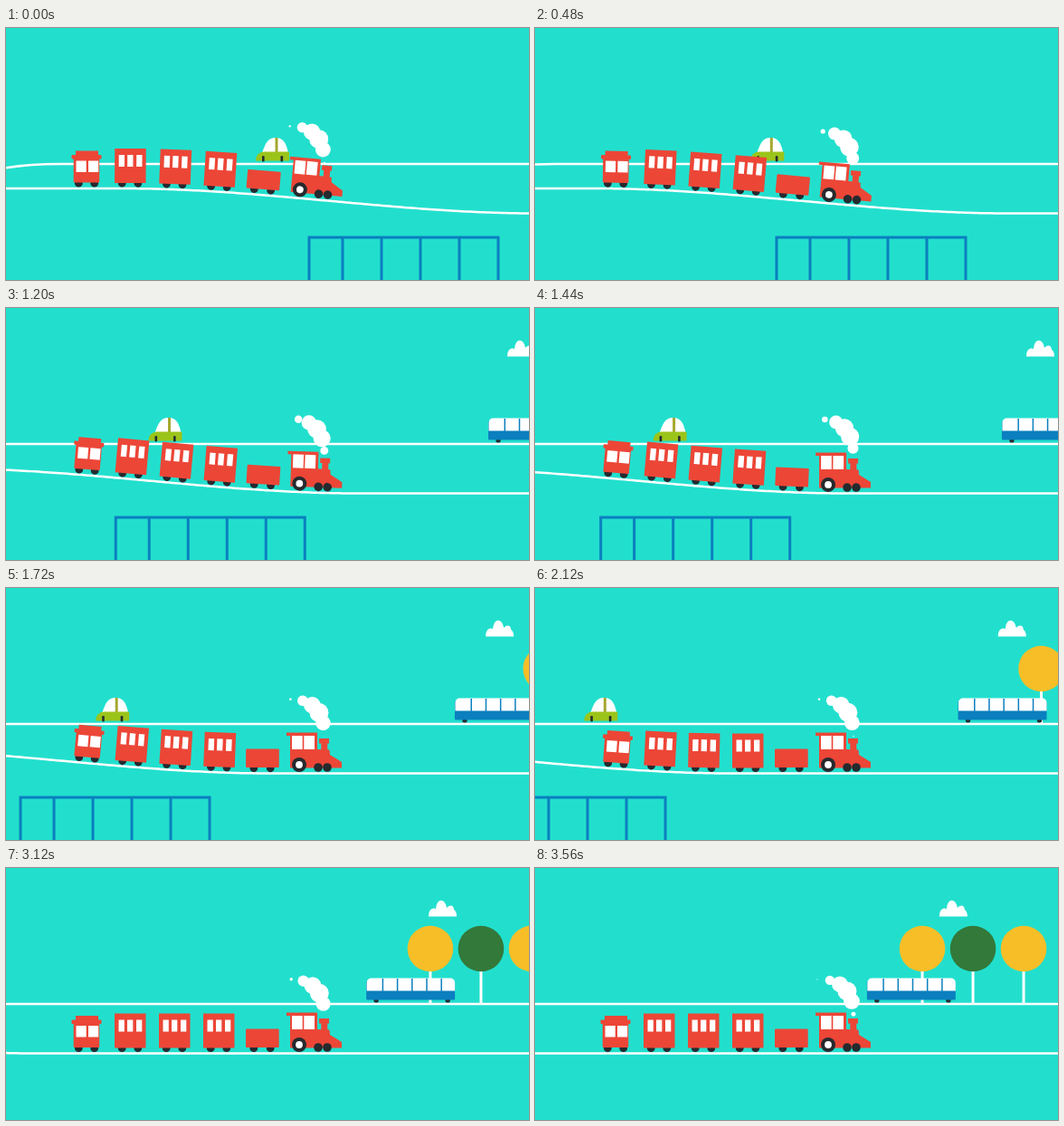
Recreate the animation shown at these times as an HTML page with a canvas. Size 578 by 278 pixels, loop 3.6 s.

```html
<!DOCTYPE html>
<html lang="en">
<head>
<meta charset="utf-8">
<title>Train</title>
<style>
  html, body { margin: 0; width: 100%; height: 100%; overflow: hidden; background: #22dfcd; }
  canvas { display: block; width: 578px; height: 278px; }
</style>
</head>
<body>
<canvas id="stage" width="578" height="278"></canvas>
<script>
const ctx = document.getElementById('stage').getContext('2d');
const W = 578, H = 278, LOOP = 3600, STEP = 40;
const TOP = 177, RAIL = 204.5, SLOPE_START = 130, SLOPE_END = 585;
const SPEED = { fence: 0.2024, track: 0.187, road: 0.1122, trees: 0.093, bus: 0.0712, cloud: 0.0459 };
const SKY = '#22dfcd', RED = '#ec4637', BLUE = '#0b7fbf', DARK = '#262a2e',
      YELLOW = '#f7be28', GREEN = '#33793a', LIME = '#9bc41a', OLIVE = '#a5a830', WHITE = '#fff';

const clamp = (v, low, high) => Math.min(high, Math.max(low, v));
const paused = (time, from, length) => clamp(time - from, 0, length);
const travelled = time => time - paused(time, 28, 144) - paused(time, 2400, 26);

function hill(u) {
  const p = clamp((u - SLOPE_START) / (SLOPE_END - SLOPE_START), 0, 1);
  return TOP + (RAIL - TOP) * p * p * (3 - 2 * p);
}

function fill(color, path) {
  ctx.fillStyle = color;
  ctx.beginPath();
  path();
  ctx.fill();
}
const disc = (color, x, y, r) => fill(color, () => ctx.arc(x, y, r, 0, 7));
const box = (color, x, y, w, h, r = 0) => fill(color, () => ctx.roundRect(x, y, w, h, r));
function stroke(color, width, path) {
  ctx.strokeStyle = color;
  ctx.lineWidth = width;
  ctx.beginPath();
  path();
  ctx.stroke();
}

function at(x, draw) {
  ctx.save();
  ctx.translate(x, 0);
  draw();
  ctx.restore();
}

// Sets a piece, drawn around x = 0 for level track, onto the slope below it
function onTrack(x, shift, draw) {
  const u = x + shift;
  ctx.save();
  ctx.translate(x, hill(u));
  ctx.rotate(Math.atan2(hill(u + 12) - hill(u - 12), 24));
  ctx.translate(0, -RAIL);
  draw();
  ctx.restore();
}

function tree(x, color) {
  box(WHITE, x - 1.5, 110, 3, 40);
  disc(color, x, 89, 25.3);
}

function cloud() {
  fill(WHITE, () => {
    ctx.moveTo(0, 53.5);
    ctx.bezierCurveTo(0, 47, 3, 43, 8, 45);
    ctx.bezierCurveTo(9, 33, 18, 33, 20, 44);
    ctx.bezierCurveTo(24, 39, 28, 42, 28, 46);
    ctx.quadraticCurveTo(31, 48, 31, 53.5);
  });
}

function bus() {
  disc(DARK, 11, 146, 2.7);
  disc(DARK, 90, 146, 2.7);
  box(BLUE, 0, 125, 98, 20.5, 1);
  box(WHITE, 0.5, 121.5, 97.5, 14, [5, 5, 0, 0]);
  for (let i = 0; i < 5; i++) box(BLUE, 17.5 + i * 16.2, 122, 1.5, 14);
}

function car() {
  fill(WHITE, () => {
    ctx.moveTo(7, 138);
    ctx.bezierCurveTo(11, 126, 14, 121, 22, 121);
    ctx.bezierCurveTo(31, 121, 34, 128, 36, 138);
  });
  box(OLIVE, 21.5, 121, 3, 17);
  box(LIME, 0, 136.5, 37, 10, [9, 1, 0, 0]);
  box(DARK, 7, 141, 2.6, 6.5, 1.3);
  box(DARK, 27.5, 141, 2.6, 6.5, 1.3);
}

function fence() {
  stroke(BLUE, 3, () => {
    ctx.rect(0, 231, 209, 60);
    for (let x = 37; x < 209; x += 43) {
      ctx.moveTo(x, 231);
      ctx.lineTo(x, H);
    }
  });
}

function wheels(spread) {
  for (const side of [-1, 1]) disc(DARK, side * spread, 198.7, 4.4);
}

function caboose() {
  wheels(8.7);
  box(RED, -12, 163, 25, 6);
  box(RED, -16.5, 167.5, 33, 4.5, 1);
  box(RED, -14.3, 171, 28.5, 27, 1);
  for (const x of [-11.5, 2]) box(WHITE, x, 174, 11.2, 12.5);
}

function wagon() {
  wheels(8.8);
  box(RED, -17, 160.5, 34.5, 38);
  for (const x of [-12.5, -3, 7]) box(WHITE, x, 167.5, 6.3, 13);
}

function tender() {
  wheels(9.2);
  box(RED, -18, 177.5, 36.7, 20.5, 1);
}

function engine() {
  box(RED, -30, 159.5, 34, 3.5);
  box(RED, -26, 162, 30, 36.5);
  box(RED, 6, 166, 11, 5.5);
  box(RED, 8.3, 171, 7, 8);
  fill(RED, () => {
    ctx.moveTo(3, 178);
    ctx.lineTo(17.5, 178.5);
    ctx.lineTo(18, 184);
    ctx.lineTo(31, 192);
    ctx.lineTo(31, 198.5);
    ctx.lineTo(3, 198.5);
  });
  for (const x of [-24, -10.7]) box(WHITE, x, 163, 11.7, 15);
  disc(DARK, -16, 195, 8);
  disc(WHITE, -16, 195, 3.9);
  for (const x of [5, 15]) disc(DARK, x, 198, 4.8);
}

// Puffs leave the chimney one by one, swell, drift back and shrink away
function smoke(travel, lift) {
  const life = 5.3, interval = 198;
  for (let age = (travel / interval + 0.05) % 1; age < life; age++) {
    const x = 352 - 1.5 * age ** 2, y = 164 - 16.5 * age + 1.65 * age ** 2;
    disc(WHITE, x, y - lift, 10.5 * Math.sin(Math.PI * (age / life) ** 0.75));
  }
}

function render(time) {
  const travel = travelled(time);
  const place = (from, layer) => from - travel * SPEED[layer];
  const shift = travel * SPEED.track;

  ctx.fillStyle = SKY;
  ctx.fillRect(0, 0, W, H);

  at(place(602.5, 'cloud'), cloud);
  [YELLOW, GREEN, YELLOW].forEach((color, i) => tree(place(743.3 + i * 56, 'trees'), color));
  at(place(608.2, 'bus'), bus);

  const bend = place(0, 'road');
  stroke(WHITE, 2.4, () => {
    ctx.moveTo(bend - 10, 156);
    ctx.quadraticCurveTo(bend + 20, 150, bend + 60, 150);
    ctx.lineTo(W, 150);
  });
  at(place(276, 'road'), car);
  at(place(335, 'fence'), fence);

  stroke(WHITE, 2.5, () => {
    for (let x = -4; x <= W + 4; x += 4) ctx.lineTo(x, hill(x + shift));
  });
  onTrack(89, shift, caboose);
  for (let i = 0; i < 3; i++) onTrack(137 + i * 49, shift, wagon);
  onTrack(283, shift, tender);
  smoke(travel, RAIL - hill(350 + shift));
  onTrack(340, shift, engine);
}

const start = performance.now();
function tick() {
  const time = (performance.now() - start) % LOOP;
  render(Math.floor(time / STEP) * STEP);
  requestAnimationFrame(tick);
}
tick();
</script>
</body>
</html>
```
